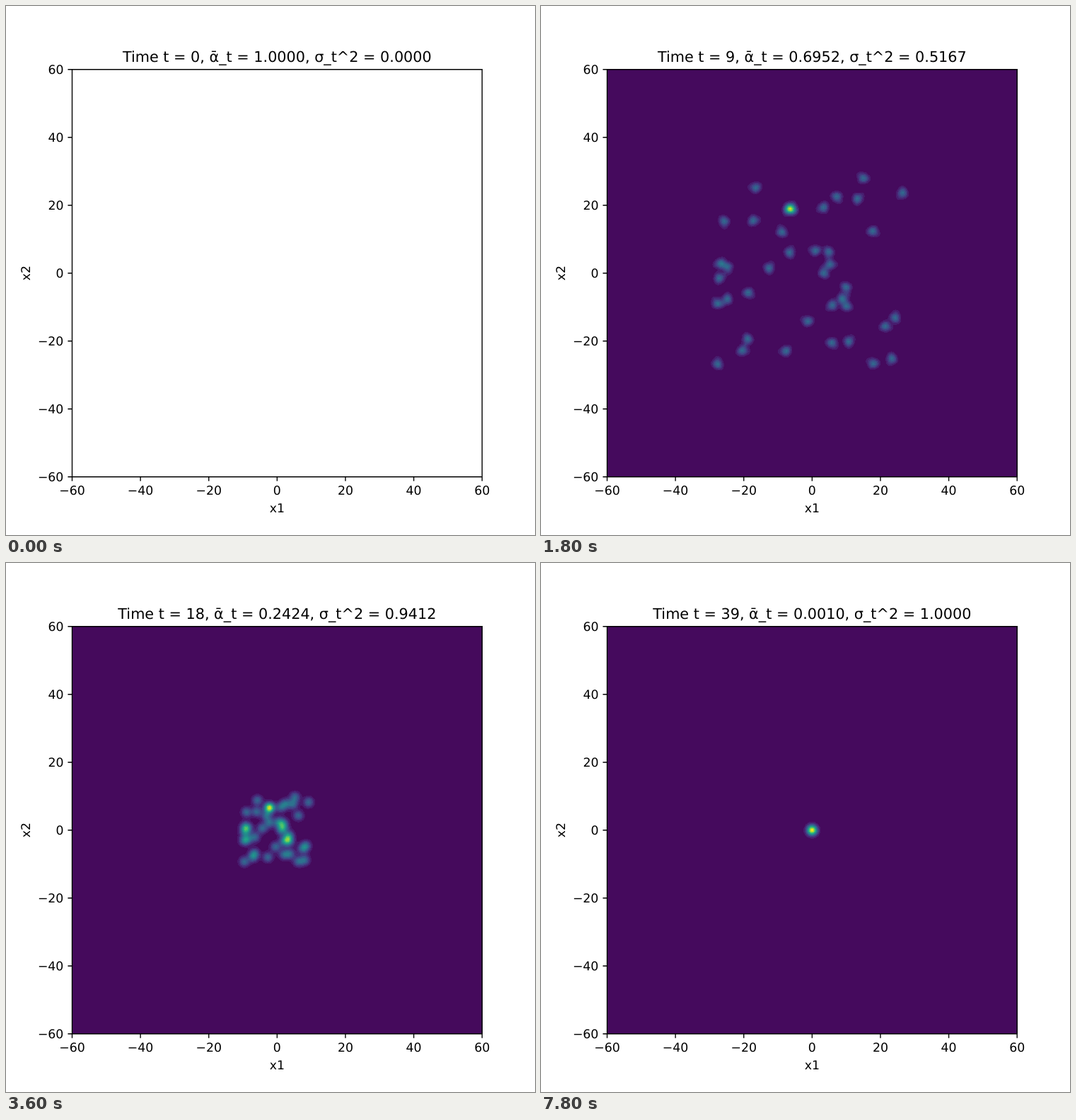
These frames come from a looping animation (748 px wide and 748 px high, 8 s). An HTML page with a canvas:

```html
<!DOCTYPE html>
<html lang="en">
<head>
<meta charset="utf-8">
<style>
  html, body { margin: 0; width: 100%; height: 100%; overflow: hidden; background: #fff; }
  canvas { position: absolute; left: 93px; top: 89px; }
  svg { position: absolute; left: 0; top: 0; }
  text { font: 17.31px "DejaVu Sans", sans-serif; text-anchor: middle; text-rendering: geometricPrecision; }
  #title { font-size: 20.78px; }
  path { fill: none; stroke: #000; stroke-width: 1.385; }
</style>
</head>
<body>
<canvas id="density" width="581" height="577"></canvas>
<svg id="chart" width="748" height="748"></svg>
<script>
const STEP_MS = 200, STEPS = 40;
const LEFT = 93.5, TOP = 89.76, WIDTH = 579.7, HEIGHT = 575.96;
const RIGHT = LEFT + WIDTH, BOTTOM = TOP + HEIGHT;
const LIMIT = 60, GRID = 200, CELL = 2 * LIMIT / (GRID - 1);
const SAMPLES = 8, SPREAD = 1;

// Mixture centres; all have equal weight, three of them overlap
const CENTRES = [
  [-9.9, 27.2], [-9.2, 27.2], [-8.5, 27.2],
  [-23.7, 36.2], [-37, 22], [-24.8, 22.3], [-12.8, 17.4], [4.8, 27.8], [10.4, 32.4],
  [19.1, 31.5], [21.6, 40.2], [38.1, 34], [25.5, 17.8], [-9.5, 8.7], [1.4, 9.5],
  [7, 9], [7.5, 3.7], [4.9, 0], [-38.6, 4.1], [-35.7, 2.7], [-39.1, -2.1],
  [-39.8, -12.9], [-35.7, -11], [-26.9, -8.3], [-18.2, 2.1], [-1.8, -20.4], [-27.1, -27.9],
  [-29.4, -32.8], [-39.8, -38.5], [-11, -33], [14.3, -6], [12.6, -10.7], [14.5, -14],
  [8.5, -13.6], [8.3, -29.5], [15.4, -29], [25.8, -38.3], [33.6, -36.2], [30.8, -22.5],
  [34.9, -18.9]
];

// Around each centre, a spiral of samples with normally distributed radii
const points = CENTRES.flatMap(([x, y], k) =>
  Array.from({ length: SAMPLES }, (_, i) => {
    const radius = SPREAD * Math.sqrt(-2 * Math.log(1 - (i + .5) / SAMPLES));
    const angle = 2.39996 * i + 1.7 * k;
    return [x + radius * Math.cos(angle), y + radius * Math.sin(angle)];
  }));

const VIRIDIS = [0x440154, 0x482475, 0x414487, 0x355f8d, 0x2a788e, 0x21908d,
  0x22a884, 0x43bf71, 0x7ad151, 0xbcdf27, 0xfde725];

function viridis(v) {
  const pos = Math.min(Math.max(v, 0), 1) * 10, i = Math.min(Math.floor(pos), 9);
  const [r, g, b] = [16, 8, 0].map(shift => {
    const from = VIRIDIS[i] >> shift & 255, to = VIRIDIS[i + 1] >> shift & 255;
    return Math.round(from + (to - from) * (pos - i));
  });
  return 0xff000000 | b << 16 | g << 8 | r;
}

function alphaBar(t) {
  let alpha = 1;
  for (let i = 1; i <= t; i++) alpha *= 1 - i / 127;
  return alpha;
}

function densityGrid(alpha, variance) {
  const grid = new Float64Array(GRID * GRID);
  const scale = 1 / (2 * Math.PI * variance * points.length);
  const reach = 6 * Math.sqrt(variance);
  const axis = center => {
    const samples = [];
    const last = Math.floor((center + reach + LIMIT) / CELL);
    for (let i = Math.ceil((center - reach + LIMIT) / CELL); i <= last; i++) {
      samples.push([i, Math.exp(-((i * CELL - LIMIT - center) ** 2) / (2 * variance))]);
    }
    return samples;
  };
  for (const [x, y] of points) {
    const columns = axis(alpha * x);
    for (const [row, gy] of axis(alpha * y))
      for (const [col, gx] of columns) grid[row * GRID + col] += scale * gx * gy;
  }
  return grid;
}

// Smallest round interval giving at most 21 levels
function levelStep(max) {
  const raw = max / 21, power = 10 ** Math.floor(Math.log10(raw));
  return power * [1, 1.5, 2, 2.5, 3, 4, 5, 6, 8, 10].find(s => s * power >= raw);
}

const canvas = document.getElementById("density");
const ctx = canvas.getContext("2d");
const image = ctx.createImageData(canvas.width, canvas.height);
const pixels = new Uint32Array(image.data.buffer);

const gridPosition = fraction => {
  const pos = Math.min(Math.max(fraction, 0), 1) * (GRID - 1);
  const cell = Math.min(Math.floor(pos), GRID - 2);
  return [cell, pos - cell];
};
const columns = Array.from({ length: canvas.width }, (_, i) => gridPosition((93.5 + i - LEFT) / WIDTH));
const rows = Array.from({ length: canvas.height }, (_, j) => gridPosition((BOTTOM - 89.5 - j) / HEIGHT));

function drawDensity(alpha, variance) {
  const grid = densityGrid(alpha, variance);
  const max = grid.reduce((a, b) => Math.max(a, b));
  const step = levelStep(max), count = Math.ceil(max / step);
  const colors = Array.from({ length: count + 1 }, (_, i) => viridis((i + .5) / count));
  let p = 0;
  for (const [row, fy] of rows) {
    for (const [col, fx] of columns) {
      const k = row * GRID + col;
      const low = grid[k] * (1 - fx) + grid[k + 1] * fx;
      const high = grid[k + GRID] * (1 - fx) + grid[k + GRID + 1] * fx;
      pixels[p++] = colors[Math.floor((low * (1 - fy) + high * fy) / step)];
    }
  }
  ctx.putImageData(image, 0, 0);
}

function buildChart() {
  let ticks = "", labels = "";
  for (let i = 0; i <= 6; i++) {
    const x = LEFT + WIDTH * i / 6, y = BOTTOM - HEIGHT * i / 6;
    const label = String(20 * i - LIMIT).replace("-", "−");
    ticks += `M${x} ${BOTTOM}v6.06M${LEFT} ${y}h-6.06`;
    labels += `<text x="${x}" y="691.4">${label}</text>
      <text x="81.4" y="${y + 6.3}" style="text-anchor:end">${label}</text>`;
  }
  document.getElementById("chart").innerHTML = `
    <path d="M${LEFT} ${TOP}H${RIGHT}V${BOTTOM}H${LEFT}Z${ticks}"/>${labels}
    <text x="383.35" y="716">x1</text>
    <text transform="translate(34.4 377.7) rotate(-90)">x2</text>
    <text id="title" x="383.35" y="79.4"></text>`;
}

buildChart();
const title = document.getElementById("title");
const start = performance.now();
let shown = -1;

function render() {
  const t = Math.floor(Math.max(performance.now() - start, 0) / STEP_MS) % STEPS;
  if (t !== shown) {
    shown = t;
    const alpha = alphaBar(t), variance = 1 - alpha * alpha;
    title.textContent = `Time t = ${t}, ᾱ_t = ${alpha.toFixed(4)}, σ_t^2 = ${variance.toFixed(4)}`;
    if (t) drawDensity(alpha, variance);
    else ctx.clearRect(0, 0, canvas.width, canvas.height);
  }
  requestAnimationFrame(render);
}
render();
</script>
</body>
</html>
```
